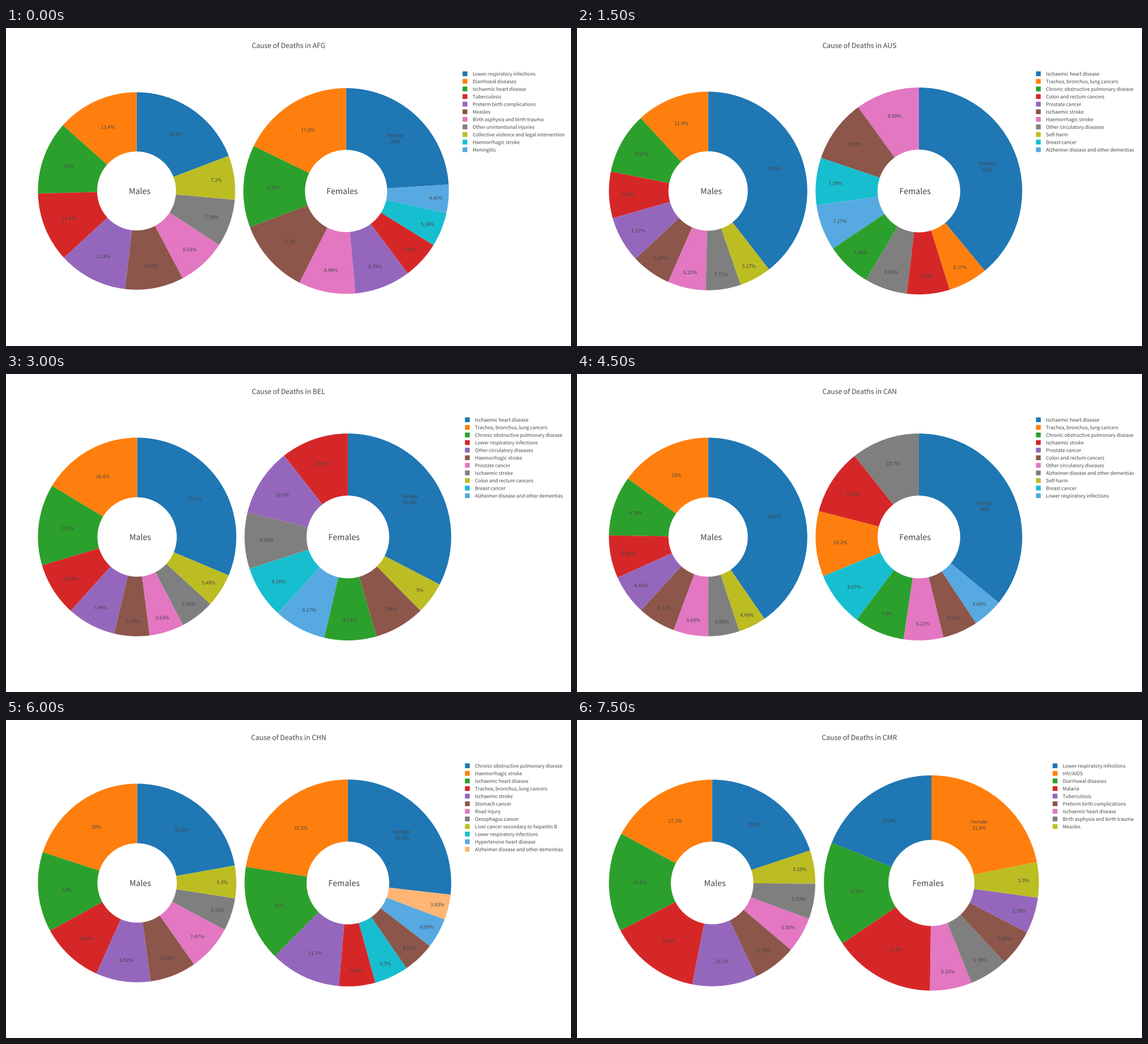
Animation of 998 by 561 pixels, one loop 8000 ms. Source, as a matplotlib script:

```python
import matplotlib.pyplot as plt
import numpy as np
from matplotlib.animation import FuncAnimation
from matplotlib.patches import PathPatch, Rectangle, Wedge
from matplotlib.textpath import TextPath
from matplotlib.transforms import Affine2D

W, H, DPI = 998, 561, 64
UNIT = 0.705                     # layout scale: pixels per chart unit
LEFT, MID_Y = 80 * UNIT, 287.5
HOLE = 0.4
SMALL, TITLE, LABEL = 8.47, 12.2, 14.2
INK = "#444444"
FONT = {"family": "Noto Sans CJK JP"}
COLORS = ["#1f77b4", "#ff7f0e", "#2ca02c", "#d62728", "#9467bd", "#8c564b",
          "#e377c2", "#7f7f7f", "#bcbd22", "#17becf", "#57a9e2", "#ffb574"]

IHD, LRI = "Ischaemic heart disease", "Lower respiratory infections"
ISC, HAE = "Ischaemic stroke", "Haemorrhagic stroke"
LUNG, COPD = "Trachea, bronchus, lung cancers", "Chronic obstructive pulmonary disease"
COLON, PROST, BREAST = "Colon and rectum cancers", "Prostate cancer", "Breast cancer"
CIRC, ALZ = "Other circulatory diseases", "Alzheimer disease and other dementias"
DIA, TB, MEASLES = "Diarrhoeal diseases", "Tuberculosis", "Measles"
PRETERM, ASPHYXIA = "Preterm birth complications", "Birth asphyxia and birth trauma"
HARM = "Self-harm"

# country, right edge of the plot, legend, male %, female %, female colours (hex digits)
SCENES = [
    ("AFG", 782.2,
     [LRI, DIA, IHD, TB, PRETERM, MEASLES, ASPHYXIA, "Other unintentional injuries",
      "Collective violence and legal intervention", HAE, "Meningitis"],
     [19.2, 13.4, 12, 11.4, 11.3, 9.62, 8.03, 7.78, 7.2],
     [24, 17.8, 12.9, 11.8, 8.94, 8.79, 5.94, 5.36, 4.45], "01256439a"),
    ("AUS", 786.4,
     [IHD, LUNG, COPD, COLON, PROST, ISC, HAE, CIRC, HARM, BREAST, ALZ],
     [39.5, 11.9, 9.97, 7.56, 7.52, 6.47, 6.22, 5.72, 5.17],
     [39, 9.99, 9.83, 7.38, 7.17, 7.08, 6.69, 6.69, 6.17], "0659a2731"),
    ("BEL", 786.4,
     [IHD, LUNG, COPD, LRI, CIRC, HAE, PROST, ISC, COLON, BREAST, ALZ],
     [31.3, 16.4, 13.2, 8.73, 7.94, 5.73, 5.63, 5.55, 5.48],
     [32.6, 10.6, 10.6, 8.76, 8.18, 8.17, 8.13, 7.94, 5], "03479a258"),
    ("CAN", 786.4,
     [IHD, LUNG, COPD, ISC, PROST, COLON, CIRC, ALZ, HARM, BREAST, LRI],
     [40.4, 15, 9.74, 6.96, 6.48, 6.17, 5.69, 5.06, 4.49],
     [36, 10.7, 10.3, 10.2, 8.57, 7.9, 6.21, 5.51, 4.69], "07319265a"),
    ("CHN", 786.4,
     [COPD, HAE, IHD, LUNG, ISC, "Stomach cancer", "Road injury", "Oesophagus cancer",
      "Liver cancer secondary to hepatitis B", LRI, "Hypertensive heart disease", ALZ],
     [22.2, 20, 13, 10.3, 8.92, 7.53, 7.47, 5.33, 5.3],
     [26.8, 22.5, 15, 11.1, 5.68, 5.3, 4.98, 4.69, 3.93], "0124395ab"),
    ("CMR", 815.9,
     [LRI, "HIV/AIDS", DIA, "Malaria", TB, PRETERM, IHD, ASPHYXIA, MEASLES],
     [19.9, 17.1, 15.5, 14.3, 10.1, 6.79, 5.56, 5.53, 5.19],
     [21.9, 18.9, 15.6, 15.3, 6.29, 5.78, 5.56, 5.39, 5.3], "102367548"),
]

fig = plt.figure(figsize=(W / DPI, H / DPI), dpi=DPI, facecolor="white")
ax = fig.add_axes([0, 0, 1, 1])


def write(x, base, text, size, center=True):
    path = TextPath((0, 0), text, size=size, prop=FONT)
    if center:
        box = path.get_extents()
        x -= (box.x0 + box.x1) / 2
    path = path.transformed(Affine2D().scale(1, -1).translate(x, base))
    ax.add_patch(PathPatch(path, fc=INK, lw=0, snap=False, zorder=3))


def donut(cx, radius, values, colors, first_label=None):
    """First slice runs clockwise from the top, the rest counterclockwise."""
    shares = np.array(values) / sum(values)
    end = -90 + 360 * shares[0]
    for i, (share, color) in enumerate(zip(shares, colors)):
        start = end - 360 * share
        ax.add_patch(Wedge((cx, MID_Y), radius, start, end, width=radius * (1 - HOLE),
                           fc=color, lw=0))
        # label sits in the middle of the largest circle that fits the slice
        s = np.sin(np.pi * min(share, 0.5))
        reach = radius * (1 - min(s / (1 + s), (1 - HOLE) / 2))
        mid = np.radians((start + end) / 2)
        x, y = cx + reach * np.cos(mid), MID_Y + reach * np.sin(mid) + 3.3
        if i == 0 and first_label:
            write(x, y - 5.5, first_label, SMALL)
            y += 5.5
        write(x, y, f"{values[i]:g}%", SMALL)
        end = start


def legend(x, names):
    half = 6 * UNIT
    for i, name in enumerate(names):
        y = 80.75 + 19 * UNIT * i
        ax.add_patch(Rectangle((x + 28.5 - half, y - half), 2 * half, 2 * half,
                               fc=COLORS[i], lw=0, snap=False))
        write(x + 42, y + 3.3, name, SMALL, center=False)


def draw(frame):
    ax.clear()
    ax.set(xlim=(0, W), ylim=(H, 0))
    ax.axis("off")
    country, right, names, males, females, order = SCENES[frame // 3]
    span = right - LEFT
    donut(LEFT + 0.24 * span, 0.24 * span, males, COLORS)
    donut(LEFT + 0.75 * span, 0.25 * span, females,
          [COLORS[int(c, 16)] for c in order], "Female")
    write(LEFT + 0.22 * span + 20.5, 293, "Males", LABEL)
    write(LEFT + 0.78 * span - 28.3, 293, "Females", LABEL)
    write(W / 2, 35.3, f"Cause of Deaths in {country}", TITLE)
    legend(right, names)
    return ax.patches


anim = FuncAnimation(fig, draw, frames=16, init_func=lambda: [], interval=500,
                     repeat=True, repeat_delay=0, blit=False)
plt.show()
```
